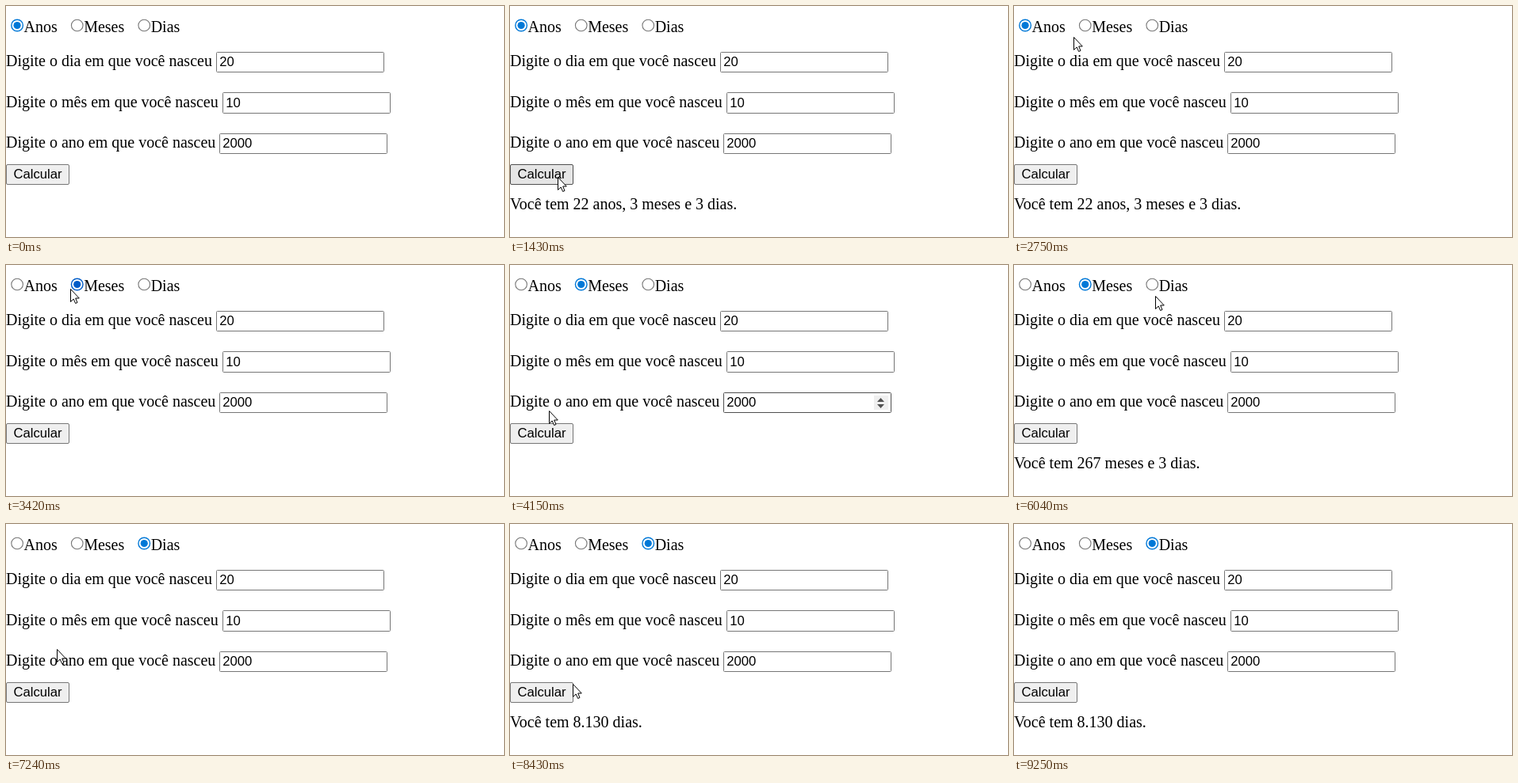
Write an HTML page that moves like this. It is 628x292 px and loops after 9.78 s.

```html
<!DOCTYPE html>
<html lang="pt">
<head>
<meta charset="utf-8">
<title>Calculadora de idade</title>
<style>
  html, body { margin: 0; width: 100%; height: 100%; overflow: hidden; background: #fff; }
  svg { display: block; }
  text { font: 20px "Liberation Serif", "Times New Roman", serif; fill: #000; white-space: pre; }
  .ui { font: 16.667px "Liberation Sans", Arial, sans-serif; }
  .box { fill: #fff; stroke: #767676; }
  .hover .box { stroke: #4f4f4f; }
  .spin { visibility: hidden; }
  .hover .spin { visibility: visible; }
  .ring { fill: #fff; stroke: #767676; stroke-width: 1.1; }
  .dot { fill: #0078d7; visibility: hidden; }
  .hover .ring { stroke: #4f4f4f; }
  .press .ring { stroke: #8d8d8d; }
  .on .ring { stroke: #0078d7; stroke-width: 1.4; }
  .on .dot { visibility: visible; }
  .on.hover .ring { stroke: #005cc8; }
  .on.hover .dot { fill: #005cc8; }
  #button rect { fill: #efefef; stroke: #767676; }
  #button.hover rect { fill: #e5e5e5; stroke: #4f4f4f; }
  #button.press rect { fill: #f5f5f5; stroke: #8d8d8d; }
</style>
</head>
<body>
<svg width="628" height="292" viewBox="0 0 628 292">
  <g id="form"></g>
  <g id="button">
    <rect x=".5" y="200.5" width="79" height="25" rx="1.5"/>
    <text class="ui" x="9.5" y="218">Calcular</text>
  </g>
  <text id="result" x="0" y="257"></text>
  <path id="cursor" d="M-.5-.5V15.5L3.2 12 5.6 17.5 8 16.5 5.7 11H10.3Z" fill="#fff" stroke="#000"/>
</svg>
<script>
const LOOP = 9780, STEP = 66, RADIO_Y = 24.5, ROW = 51.5;
const $ = id => document.getElementById(id);
const form = $('form'), button = $('button'), result = $('result'), cursor = $('cursor');

function add(parent, markup) {
  parent.insertAdjacentHTML('beforeend', `<g>${markup}</g>`);
  return parent.lastElementChild;
}
const textWidth = el => el.querySelector('text').getComputedTextLength();

let nextX = 14.1;
const radios = ['Anos', 'Meses', 'Dias'].map(label => {
  const x = nextX;
  const el = add(form, `<circle class="ring" cx="${x}" cy="${RADIO_Y}" r="7.3"/>
    <circle class="dot" cx="${x}" cy="${RADIO_Y}" r="4.6"/>
    <text x="${x + 8.4}" y="33">${label}</text>`);
  nextX += textWidth(el) + 33.4;
  return { x, el };
});

const fields = [['dia', 20], ['mês', 10], ['ano', 2000]].map(([unit, value], i) => {
  const base = Math.round(76 + ROW * i), y = Math.floor(58 + ROW * i);
  const el = add(form, `<text x="0" y="${base}">Digite o ${unit} em que você nasceu</text>`);
  const x = Math.round(textWidth(el) + 5);
  add(el, `<rect class="box" x="${x + .5}" y="${y + .5}" width="211" height="${25 + i % 2}" rx="1"/>
    <text class="ui" x="${x + 4.25}" y="${base}">${value}</text>
    <g class="spin" transform="translate(${x + 190} ${y + 4})">
      <rect width="18" height="18" fill="#efefef"/>
      <path d="M4 8l4.5-5 4.5 5zM4 11l4.5 5 4.5-5z" fill="#505050"/>
    </g>`);
  return { x, base, el };
});

// pace > 1 slows toward the end, pace < 1 speeds up; bend bows the path sideways
const moves = [
  { start: 460, end: 1100, to: [61, 217], pace: 1.3 },
  { start: 2210, end: 2400, to: [73, 44], pace: 1.7, bend: 4 },
  { start: 2750, end: 3070, to: [80, 34], pace: 2.5 },
  { start: 3220, end: 3220, to: [82, 31] },
  { start: 3750, end: 4420, to: [60, 218], pace: 1.75, bend: 25 },
  { start: 5350, end: 6040, to: [179, 40], pace: 1.5 },
  { start: 6300, end: 6360, to: [179, 28] },
  { start: 6970, end: 7370, to: [46, 194], pace: 1.35, bend: 12 },
  { start: 7510, end: 7510, to: [48, 206] },
  { start: 8430, end: 9250, to: [540, 300], pace: .8, bend: -40 }
];

const clicks = [
  { down: -1, up: 0, choice: 0, answer: '' },
  { down: 1240, up: 1370, choice: 0, answer: 'Você tem 22 anos, 3 meses e 3 dias.' },
  { down: 3220, up: 3350, choice: 1, answer: '' },
  { down: 4560, up: 4560, choice: 1, answer: 'Você tem 267 meses e 3 dias.' },
  { down: 6500, up: 6630, choice: 2, answer: '' },
  { down: 7770, up: 7910, choice: 2, answer: 'Você tem 8.130 dias.' }
];

function pointer(t) {
  let pos = [390, 296];
  for (const { start, end, to, pace = 1, bend = 0 } of moves) {
    if (t < start) break;
    const steps = Math.round((end - start) / STEP) + 1;
    const step = Math.floor((t - start) / STEP + .1) + 1;
    const u = t >= end ? 1 : Math.min(1, step / steps);
    const e = 1 - (1 - u) ** pace;
    const [x, y] = pos, dx = to[0] - x, dy = to[1] - y;
    const bow = 4 * e * (1 - e) * bend / Math.hypot(dx, dy);
    pos = [x + dx * e - dy * bow, y + dy * e + dx * bow];
  }
  return t < moves[0].start ? [-100, -100] : pos;
}

function setHover(el, hover, pressed) {
  el.classList.toggle('hover', hover);
  el.classList.toggle('press', hover && pressed);
}

function draw(t) {
  const [x, y] = pointer(t);
  const pressed = clicks.some(c => t >= c.down && t < c.up);
  const { choice, answer } = clicks.filter(c => c.up <= t).pop();

  radios.forEach((radio, i) => {
    setHover(radio.el, Math.hypot(x - radio.x, y - RADIO_Y) < 11, pressed);
    radio.el.classList.toggle('on', i === choice);
  });
  fields.forEach(f => setHover(f.el, x > 0 && x < f.x - 5 && y > f.base - 17 && y < f.base + 8, false));
  setHover(button, x >= 0 && x < 80 && y >= 200 && y < 226, pressed);

  if (result.textContent !== answer) result.textContent = answer;
  cursor.setAttribute('transform', `translate(${Math.round(x)} ${Math.round(y)})`);
}

const begin = performance.now();
function frame() {
  draw((performance.now() - begin) % LOOP);
  requestAnimationFrame(frame);
}
frame();
</script>
</body>
</html>
```
